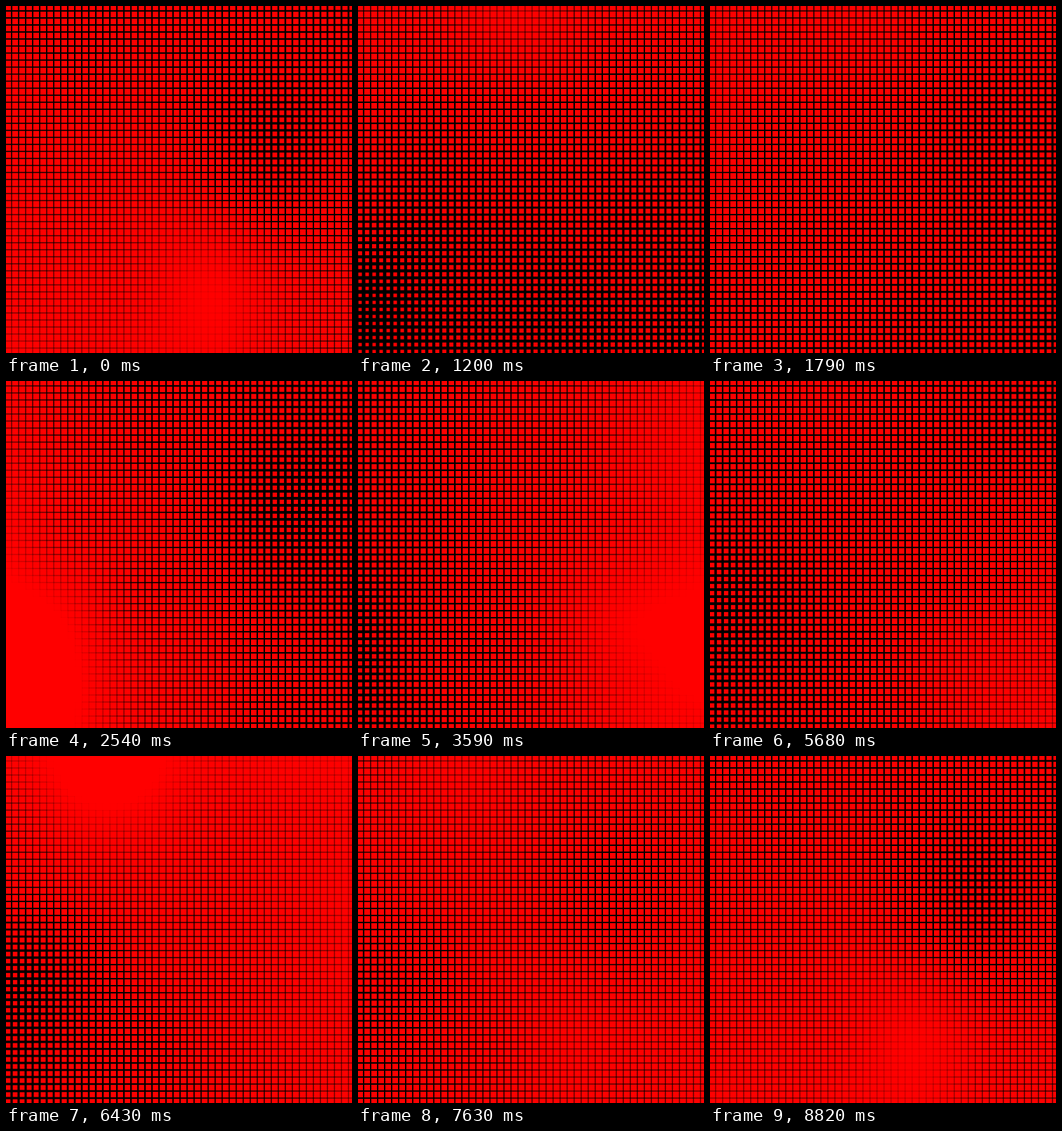
Recreate the animation shown at these times as an HTML page with a canvas. Size 493 by 494 pixels, loop 8.93 s.

```html
<!DOCTYPE html>
<html lang="en">
<head>
<meta charset="utf-8">
<title>Halftone squares</title>
<style>
  html, body { margin: 0; width: 100%; height: 100%; overflow: hidden; background: #000; }
  canvas { display: block; }
</style>
</head>
<body>
<canvas id="stage" width="493" height="494"></canvas>
<script>
const ctx = document.getElementById('stage').getContext('2d');
const LOOP = 8930, STEPS = 60, PITCH = 10, CELLS = 50, HALF = 247;

// Key moods of the field: mean size, slope across and down, twist, and two spots.
const moods = [
  { step: 0, mean: 8.5, slope: [-.3, .8], twist: .1, dark: [380, 190], bright: [290, 400] },
  { step: 8, mean: 7.2, slope: [0, -1.2], twist: .2, dark: [10, 420], bright: [220, 20] },
  { step: 17, mean: 8.3, slope: [-1.3, .5], twist: -.4, dark: [400, 180], bright: [20, 400] },
  { step: 24, mean: 8.3, slope: [1.3, 0], twist: .2, dark: [-60, 400], bright: [390, 370] },
  { step: 33, mean: 6.7, slope: [.6, 1], twist: 1.1, dark: [460, 30], bright: [390, 400] },
  { step: 43, mean: 8.8, slope: [.6, -.8], twist: .6, dark: [15, 310], bright: [150, 10] }
];

const mix = (a, b, k) => a + (b - a) * k;
const ease = k => k * k * (3 - 2 * k);

function random(i, j, seed) {
  const n = Math.sin(i * 127.1 + j * 311.7 + seed * 74.7) * 43758.5;
  return n - Math.floor(n);
}

// Smooth value noise from -1 to 1.
function noise(x, y, seed) {
  const i = Math.floor(x), j = Math.floor(y), k = ease(x - i);
  const along = row => mix(random(i, row, seed), random(i + 1, row, seed), k);
  return 2 * mix(along(j), along(j + 1), ease(y - j)) - 1;
}

const spot = (x, y, [sx, sy]) => Math.exp(-((x - sx) ** 2 + (y - sy) ** 2) / 10000);

function sizeAt({ step, mean, slope, twist, dark, bright }, x, y) {
  const u = x / HALF - 1, v = y / HALF - 1;
  return mean + slope[0] * u + slope[1] * v + twist * u * v
    + spot(x, y, bright) - 1.5 * spot(x, y, dark) + .25 * noise(x / 100, y / 100, step);
}

// Steps last 150 ms, except one in 22 that lasts 140 ms.
const startOf = step => 150 * step - 10 * Math.floor((step + 13) / 22);

function draw(step) {
  const index = moods.findLastIndex(mood => mood.step <= step);
  const from = moods[index], to = moods[(index + 1) % moods.length];
  const k = (step - from.step) / ((to.step || STEPS) - from.step);
  ctx.fillStyle = '#000';
  ctx.fillRect(0, 0, 493, 494);
  ctx.fillStyle = '#f00';
  for (let row = 0; row < CELLS; row++) {
    for (let col = 0; col < CELLS; col++) {
      const x = col * PITCH + 3, y = row * PITCH + 2;
      const size = Math.min(PITCH, mix(sizeAt(from, x, y), sizeAt(to, x, y), k));
      ctx.fillRect(x - size / 2, y - size / 2, size, size);
    }
  }
}

let shown = -1;
function tick() {
  const time = performance.now() % LOOP;
  let step = STEPS - 1;
  while (startOf(step) > time) step--;
  if (step !== shown) draw(shown = step);
  requestAnimationFrame(tick);
}
tick();
</script>
</body>
</html>
```
